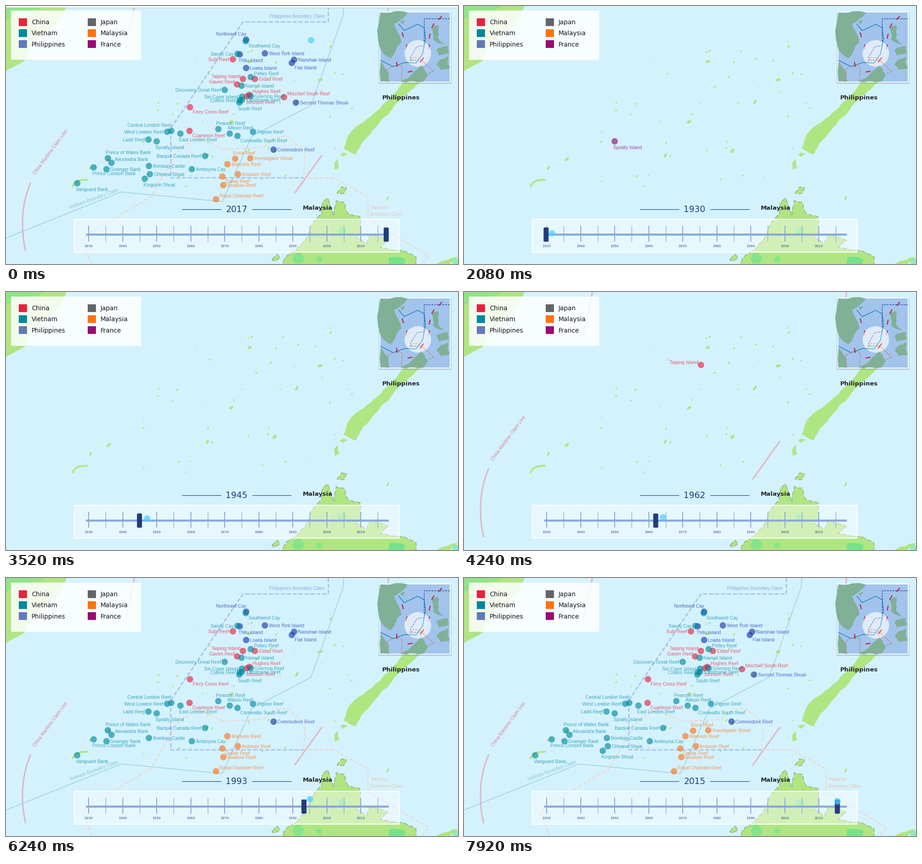
Write a matplotlib script that moves like this. It is 990 by 566 pixels and loops after 8000 ms.

```python
import numpy as np
import matplotlib.pyplot as plt
from matplotlib.animation import FuncAnimation
from matplotlib.collections import EllipseCollection, LineCollection
from matplotlib.patches import Circle, FancyBboxPatch, PathPatch, Polygon, Rectangle
from matplotlib.path import Path

W, H, DPI = 990, 566, 100
STEP, FRAMES = 80, 100
PX = 72 / DPI

SEA, LAND, FOREST = "#d4f2fe", "#afe681", "#66e38f"
NAVY, TRACK = "#1f3d7f", "#87a9da"
SANS, WIDE = "Liberation Sans", "DejaVu Sans"
LEGEND = {"China": "#e9213c", "Vietnam": "#00899e", "Philippines": "#6378b9",
          "Japan": "#626567", "Malaysia": "#ff7212", "France": "#960c72"}
MARKER = {**LEGEND, "Philippines": "#1838ac"}

fig = plt.figure(figsize=(W / DPI, H / DPI), dpi=DPI, facecolor=SEA)
ax = fig.add_axes([0, 0, 1, 1])
ax.set(xlim=(0, W), ylim=(H, 0))
ax.axis("off")
rng = np.random.default_rng(4)


def polygon(points, color=LAND, z=1, **kw):
    return ax.add_patch(Polygon(points, fc=color, zorder=z, **{"lw": 0, **kw}))


def rect(x0, y0, x1, y1, color, z, **kw):
    return ax.add_patch(Rectangle((x0, y0), x1 - x0, y1 - y0, fc=color, zorder=z,
                                  **{"lw": 0, **kw}))


def line(points, color, width, z=3, dash=None):
    style = (0, [d / width for d in dash]) if dash else "-"
    return ax.plot(*zip(*points), color=color, lw=width * PX, ls=style, zorder=z,
                   solid_capstyle="butt", dash_capstyle="butt")[0]


def label(x, y, text, size, color, z=6, font=SANS, **kw):
    """Text whose capitals are centred on y."""
    return ax.text(x, y + 0.36 * size, text, fontsize=size * PX, color=color,
                   family=font, va="baseline", zorder=z, **kw)


def slanted(x, y, text, angle, color):
    return ax.text(x, y, text, fontsize=10.2 * PX, color=color, family=SANS, zorder=3,
                   ha="center", va="center", rotation=angle)


def coast(points, roughness=.09, levels=2):
    """Closed outline made ragged by midpoint displacement."""
    points = np.array(points, float)
    for _ in range(levels):
        step = np.roll(points, -1, axis=0) - points
        normal = step[:, ::-1] * (1, -1)
        shift = rng.uniform(-roughness, roughness, (len(points), 1))
        middle = points + step / 2 + normal * shift
        points = np.stack([points, middle], axis=1).reshape(-1, 2)
    return points


def ribbon(spine, widths):
    """Outline of a band along a spine, tapering by the given widths."""
    spine = np.array(spine, float)
    along = np.gradient(spine, axis=0)
    side = along[:, ::-1] * (-1, 1) / np.hypot(*along.T)[:, None]
    side *= np.array(widths)[:, None] / 2
    return np.r_[spine + side, (spine - side)[::-1]]


def draw_land():
    polygon(coast([(0, 0), (133, 0), (118, 30), (60, 82), (40, 121), (20, 131), (0, 143)], .04))
    polygon(coast([(0, 0), (84, 0), (30, 16), (0, 30)]), FOREST, alpha=.4)
    polygon(coast(ribbon([(753, 319), (770, 285), (800, 257), (828, 232), (850, 206),
                          (875, 180), (894, 158)], [30, 34, 26, 22, 18, 24, 32]), .08))
    polygon(coast([(719, 344), (727, 335), (730, 355), (720, 359)]))
    polygon(coast([(731, 326), (740, 321), (749, 324), (738, 331)]))

    border = dict(ec="#96a083", lw=1.4 * PX, ls=(0, (7, 3)))
    polygon(coast([(600, 575), (615, 548), (655, 514), (668, 483), (690, 456), (693, 432),
                   (705, 421), (711, 440), (719, 461), (723, 427), (740, 430), (749, 455),
                   (775, 462), (777, 496), (767, 508), (790, 522), (800, 501), (838, 515),
                   (820, 530), (868, 536), (898, 550), (895, 575)]), **border)
    polygon(coast([(725, 411), (735, 397), (746, 398), (741, 411)]), **border)
    polygon(coast([(582, 556), (594, 545), (600, 553), (588, 560)]), **border)
    polygon(coast([(942, 566), (962, 558), (990, 550), (972, 566)]))
    polygon(coast([(838, 566), (840, 551), (875, 555), (873, 566)]), FOREST, alpha=.8)
    for x, y, r in ((640, 554, 13), (686, 556, 7), (736, 494, 10), (985, 562, 8)):
        turn = np.arange(0, 2 * np.pi, 1)
        polygon(coast(np.c_[x + r * np.cos(turn), y + r * np.sin(turn)], .2), FOREST, alpha=.6)


def draw_islets(small=42):
    large = [(534, 122), (637, 211), (688, 162), (493, 254), (588, 318), (441, 328),
             (225, 336), (185, 355), (836, 422)]
    n, m = small, len(large)
    spots = rng.uniform((300, 70), (760, 400), (n, 2))
    widths = np.r_[rng.uniform(4, 7, n), rng.uniform(9, 12, m)]
    ax.add_collection(EllipseCollection(
        widths, widths * rng.uniform(.4, .6, n + m), rng.uniform(-70, -15, n + m),
        units="xy", offsets=np.r_[spots, large], transOffset=ax.transData,
        facecolors=LAND, linewidths=0, zorder=1))
    reef = Path([(145, 397), (153, 380), (165, 382), (179, 381)], [1, 4, 4, 4])
    ax.add_patch(PathPatch(reef, fc="none", ec=LAND, lw=4 * PX, zorder=1))


def draw_inset():
    for grow in (1, 2, 3):
        rect(819 - grow, 13, 973 + grow, 168 + grow, "#52718a", 7, alpha=.15)
    rect(819, 13, 973, 167, "#a2c4ec", 7, ec="white", lw=2 * PX)
    lands = [[(820, 14), (880, 14), (850, 40), (866, 80), (842, 115), (820, 95)],
             [(862, 33), (874, 31), (869, 41)],
             [(932, 47), (947, 42), (946, 70), (960, 86), (936, 74)],
             [(943, 96), (968, 88), (970, 103), (948, 109)],
             [(943, 128), (968, 110), (972, 137), (952, 140)],
             [(912, 124), (929, 106), (915, 126)],
             [(864, 166), (893, 145), (908, 127), (924, 150), (914, 166)],
             [(820, 122), (838, 148), (840, 166), (820, 166)]]
    for points in lands:
        polygon(coast(points, .12), "#80b096", 8)

    vietnam = [(860, 39), (872, 54), (902, 40), (916, 48), (919, 72), (912, 106), (898, 125),
               (873, 124), (848, 133), (820, 119)]
    philippines = [(972, 28), (916, 28), (916, 87), (900, 89), (886, 112), (886, 119), (908, 119)]
    malaysia = [(884, 123), (890, 113), (905, 114), (937, 143), (925, 148)]
    line(vietnam, "#2387c4", 1.6, 9)
    line(philippines, "#3457bb", 1.6, 9, (4, 2))
    for points in ([(838, 166), (836, 138), (858, 128), (868, 135), (866, 166)], malaysia):
        line(points, "#c58076", 1.5, 9, (4, 2))

    # Short strokes that follow the curve through their centres
    centres = np.array([(869, 63), (877, 90), (856, 128), (885, 144), (911, 118), (926, 90),
                        (928, 66), (935, 43), (951, 26)], float)
    along = np.gradient(centres, axis=0)
    half = 5.5 * along / np.hypot(*along.T)[:, None]
    ax.add_collection(LineCollection(np.stack([centres - half, centres + half], axis=1),
                                     colors="#c31c40", linewidths=2.2 * PX, zorder=9))

    focus = Circle((902, 104), 29, fc="white", alpha=.68, lw=0, zorder=9.5)
    ax.add_patch(focus)
    for points, color, dash in ((vietnam, "#58b7d9", None), (philippines, "#7e9de0", (4, 2)),
                                (malaysia, "#f0ae60", (4, 2)),
                                ([(907, 124), (915, 113)], "#e23648", None)):
        line(points, color, 1.6, 10, dash).set_clip_path(focus)


def draw_panels():
    rect(11, 10, 296, 118, "white", 5, alpha=.86)
    for i, (name, color) in enumerate(LEGEND.items()):
        x, y = 28 + 151 * (i // 3), 35 + 24.3 * (i % 3)
        rect(x, y - 8.5, x + 17.5, y + 8.5, color, 6)
        label(x + 28, y, name, 13.7, "#15161f", font=WIDE)
    rect(150, 468, 861, 540, "white", 5, alpha=.43)
    rect(150, 468, 861, 540, "none", 5, ec="white", lw=2 * PX)
    line([(175, 500.5), (838, 500.5)], TRACK, 4.5, 6)
    for i in range(18):
        x = 181 + 37.25 * i
        line([(x, 482), (x, 517)], TRACK, 1.3 if i % 2 else 2, 6)
        if i % 2 == 0:
            label(x, 526.5, str(1930 + 5 * i), 7.5, "#2d4b88", font=WIDE, ha="center")
    for x in (385, 539):
        line([(x, 446), (x + 86, 446)], NAVY, 1.2, 6)
    for x, y, name in ((824, 200, "Philippines"), (650, 442, "Malaysia")):
        label(x, y, name, 13.2, "#26282c", z=4, font=WIDE, weight="bold")


def draw_claims():
    """Artists of each claim, keyed by the first year it is shown."""
    pink, teal, blue, peach = "#dfb7c8", "#a4d8e2", "#a6c1e8", "#efd4c4"
    arc = Path([(54, 387), (33, 437), (32, 490), (43, 538)], [1, 4, 4, 4])
    china = [line([(281, 0), (276, 28), (261, 96)], pink, 3),
             line([(838, 0), (836, 14)], pink, 3),
             line([(692, 327), (632, 411)], pink, 3.2),
             ax.add_patch(PathPatch(arc, fc="none", ec=pink, lw=3.2 * PX, zorder=3)),
             slanted(97, 321, "China Maritime Claim Line", 53.5, "#d58ba2")]
    vietnam = [line([(740, 0), (738, 22), (668, 218), (538, 286), (474, 429), (252, 408),
                     (0, 509)], teal, 2),
               slanted(193, 423, "Vietnam Boundary Claim", 20, "#8fc6d6")]
    philippines = [line([(706, 0), (706, 35), (519, 35), (361, 268), (361, 377), (654, 377)],
                        blue, 2.8, dash=(9, 4)),
                   label(576, 22, "Philippines Boundary Claim", 10, "#8aabdc", 3)]
    malaysia = [line([(188, 566), (168, 515), (180, 500), (318, 418), (372, 322), (410, 292),
                      (433, 293), (477, 315), (563, 310), (590, 289), (615, 285), (655, 318),
                      (652, 377), (718, 377), (793, 419), (793, 468), (926, 548), (910, 566)],
                     peach, 2.2, dash=(8, 4)),
                label(798, 441, "Malaysia", 10, "#e9c9b6", 3),
                label(798, 456, "Boundary Claim", 10, "#e9c9b6", 3)]
    return {1947: china, 1977: vietnam, 1978: philippines, 1979: malaysia}


# Where a label sits around its marker: offset and alignment
SIDES = {"E": (8.5, .5, "left"), "SE": (6, 10, "left"), "S": (-3, 13, "left"),
         "N": (-5, -13, "left"), "NE": (7, -8, "left"), "W": (-8.5, 0, "right"),
         "NW": (-5.5, -6, "right"), "NNW": (0, -13, "right")}

# Markers taken by each holder from the given year on
HOLDINGS = {
    ("Philippines", 1970): [
        ("Northeast Cay", 526, 74, "NNW"), ("Thitu Island", 512, 106, "S"),
        ("West York Island", 567, 104, "E"), ("Nanshan Island", 631, 118, "E"),
        ("Flat Island", 626, 125, "SE"), ("Loaita Island", 526, 136, "E")],
    ("Philippines", 1980): [("Commodore Reef", 586, 315, "E")],
    ("Philippines", 1999): [("Second Thomas Shoal", 635, 212, "E")],
    ("China", 1946): [("Taiping Island", 519, 160, "NW")],
    ("China", 1988): [
        ("Subi Reef", 497, 117, "W"), ("Gaven Reef", 506, 172, "NW"),
        ("Hughes Reef", 533, 195, "NE"), ("Johnson Reef", 528, 198, "S"),
        ("Fiery Cross Reef", 403, 222, "SE"), ("Cuarteron Reef", 402, 274, "SE")],
    ("China", 1990): [("Eldad Reef", 545, 160, "E")],
    ("China", 1995): [("Mischief South Reef", 609, 200, "NE")],
    ("Malaysia", 1977): [("Ardasier Reef", 508, 369, "E")],
    ("Malaysia", 1986): [
        ("Marivels Reef", 485, 347, "E"), ("Dallas Reef", 474, 374, "SE"),
        ("Swallow Reef", 476, 393, "E"), ("Royal Charlotte Reef", 460, 424, "NE")],
    ("Malaysia", 1999): [("Erica Reef", 502, 335, "N"), ("Investigator Shoal", 535, 334, "E")],
    ("Vietnam", 1974): [
        ("Southwest Cay", 525, 77, "SE"), ("Sandy Cay", 507, 105, "W"),
        ("Namyit Island", 516, 175, "E"), ("Sin Cowe Island", 517, 199, "W"),
        ("Spratly Island", 330, 297, "S"), ("Amboyna Cay", 407, 358, "E")],
    ("Vietnam", 1978): [
        ("Grierson Reef", 536, 198, "E"), ("Pearson Reef", 465, 270, "N"),
        ("Central London Reef", 362, 274, "NNW")],
    ("Vietnam", 1988): [
        ("Petley Reef", 536, 156, "NE"), ("Discovery Great Reef", 479, 184, "W"),
        ("Collins Reef", 512, 207, "W"), ("Lanstowne Reef", 517, 206, "E"),
        ("South Reef", 511, 212, "S"), ("Allison Reef", 490, 280, "N"),
        ("Pigeon Reef", 541, 276, "E"), ("Cornwallis South Reef", 507, 285, "SE"),
        ("West London Reef", 353, 276, "W"), ("East London Reef", 382, 280, "S"),
        ("Ladd Reef", 312, 293, "W"), ("Barque Canada Reef", 436, 329, "W")],
    ("Vietnam", 1990): [
        ("Prince of Wales Bank", 223, 334, "N"), ("Alexandra Bank", 231, 344, "NE"),
        ("Grainger Bank", 220, 358, "E"), ("Prince Consort Bank", 192, 354, "S"),
        ("Bombay Castle", 313, 351, "E"), ("Vanguard Bank", 156, 389, "S")],
    ("Vietnam", 1998): [("Orleana Shoal", 315, 369, "E"), ("Kingston Shoal", 304, 379, "S")],
}
FRENCH = {"Northeast Cay", "Southwest Cay", "Thitu Island", "Loaita Island",
          "Taiping Island", "South Reef", "Spratly Island", "Amboyna Cay"}
CHINESE = {"Sandy Cay", "West York Island", "Nanshan Island", "Eldad Reef", "Namyit Island",
           "Sin Cowe Island", "Second Thomas Shoal", "Royal Charlotte Reef"}


def owner_in(year, name, owner, since):
    if year >= since:
        return owner
    if year < 1945 and name in FRENCH | CHINESE:
        if year >= 1939:
            return "Japan"
        if name in FRENCH and (year >= 1933 or name == "Spratly Island"):
            return "France"
        if name in CHINESE and year >= 1935:
            return "China"
    return None


draw_land()
draw_islets()
claims = draw_claims()
draw_panels()
draw_inset()

islands = []
for (holder, since), places in HOLDINGS.items():
    for name, x, y, side in places:
        dx, dy, align = SIDES[side]
        dot = ax.add_patch(Circle((x, y), 7, lw=0, alpha=.64, zorder=4))
        text = label(x + dx, y + dy, name, 10.4, "k", 4.5, ha=align, alpha=.72)
        islands.append((name, holder, since, dot, text))

year_text = label(505, 445, "2017", 18.8, NAVY, font=WIDE, ha="center")
handle = ax.add_patch(FancyBboxPatch((0, 488), 7, 27, boxstyle="round,pad=2,rounding_size=2",
                                     fc=NAVY, lw=0, zorder=7))
cursor = ax.add_patch(Circle((0, 0), 7, fc="#4fd0ff", alpha=.72, lw=0, zorder=12))
ripple = ax.add_patch(Circle((177, 499), 7, fc="#4fd0ff", lw=0, zorder=12))
top_edge = [rect(0, 0, W, 3, "white", 13), line([(0, 3.5), (W, 3.5)], "#b9c3c8", 1, 13, (4, 1))]

# The pointer moves steadily between these stops and rests at each one
STOPS = [(668, 75), (603, 188), (177, 499), (295, 497), (521, 493), (685, 484), (818, 490)]
MOVES = [(0, 320), (400, 1040), (1920, 3120), (3440, 4720), (5040, 6400), (6720, 7840)]
LAG, FIRST_X, YEAR_W = 80, 179, 7.505


def pointer(t):
    times = np.ravel(MOVES)
    rests = np.repeat(STOPS, 2, axis=0)[1:-1]
    return [np.interp(t, times, rests[:, k]) for k in (0, 1)]


def year_at(t):
    """The slider follows the pointer a little late and snaps to whole years."""
    if t < 1520:
        return 2017
    return max(1930, int(1930 + (pointer(t - LAG)[0] - FIRST_X) / YEAR_W))


def update(frame):
    t = frame * STEP
    year = year_at(t)
    year_text.set_text(str(year))
    handle.set_x(FIRST_X + (year - 1930) * YEAR_W - 2.7)
    for since, artists in claims.items():
        for artist in artists:
            artist.set_visible(year >= since)
    for name, holder, since, dot, text in islands:
        owner = owner_in(year, name, holder, since)
        for artist in (dot, text):
            artist.set_visible(owner is not None)
            if owner:
                artist.set_color(MARKER[owner])
    cursor.set_center(pointer(t))
    cursor.set_visible(not 1280 <= t < 1680)
    grow = (t - 1040) / 240
    ripple.set_visible(0 < grow < 1)
    ripple.set_radius(7 + 31 * np.clip(grow * 1.4, 0, 1))
    ripple.set_alpha(float(np.clip(.6 * (1 - grow), 0, 1)))
    for artist in top_edge:
        artist.set_visible(t < 160)
    return []


animation = FuncAnimation(fig, update, frames=FRAMES, interval=STEP, repeat=True,
                          repeat_delay=0, blit=False)
plt.show()
```
